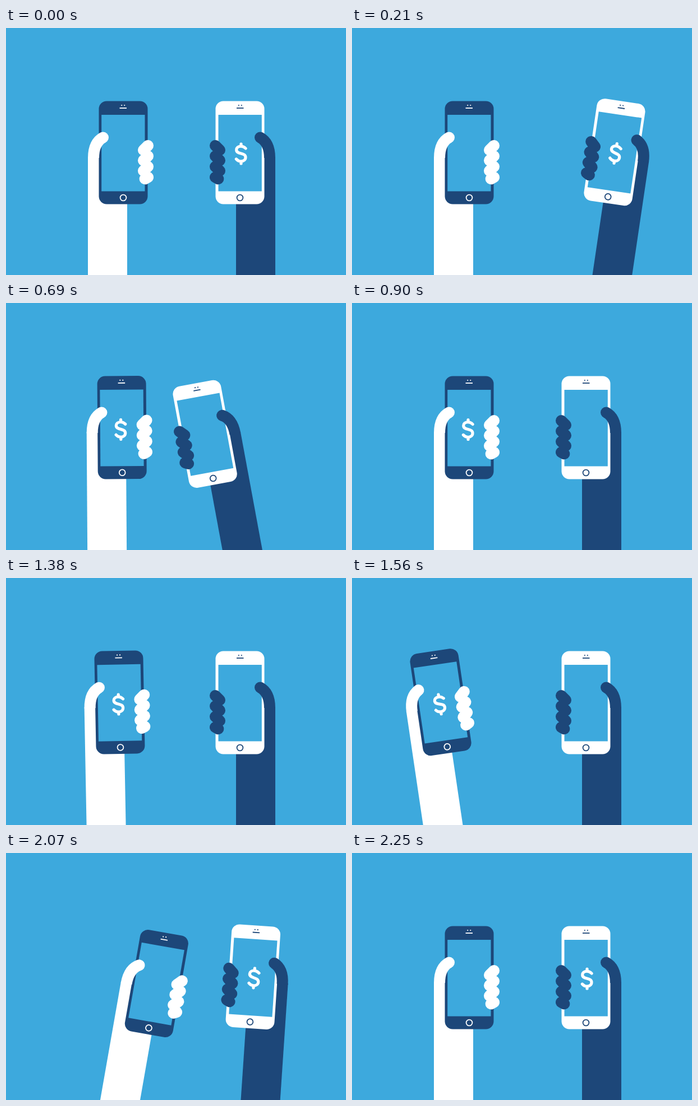
Animation, 606 px wide and 441 px high, one loop 2.7 s. Source, as an HTML page:

```html
<!DOCTYPE html>
<html lang="en">
<head>
<meta charset="utf-8">
<title>Phone to phone payment</title>
<style>
  html, body { margin: 0; width: 100%; height: 100%; overflow: hidden; background: #3da9dd; }
  svg { display: block; width: 100%; height: 100%; }
  .white-hand { --hand: #fff; --phone: #1d4779; }
  .navy-hand { --hand: #1d4779; --phone: #fff; }
  .arm { fill: var(--hand); }
  .case { fill: var(--phone); }
  .screen { fill: #3da9dd; }
  .grip { fill: none; stroke: var(--hand); stroke-width: 20; stroke-linecap: round; }
  .thumb { stroke-linecap: butt; }
  .detail { fill: none; stroke: var(--hand); stroke-width: 1.8; }
  .dot { fill: var(--hand); }
  #cash { fill: none; stroke: #fff; stroke-width: 5.2; stroke-linecap: round; }
</style>
</head>
<body>
<svg viewBox="0 0 606 441">
  <defs>
    <g id="hand">
      <rect class="arm" x="146" y="230" width="70" height="480"/>
      <rect class="case" x="165.5" y="130.5" width="87" height="184" rx="14"/>
      <rect class="screen" x="170.2" y="155" width="77.3" height="136.5"/>
      <circle class="dot" cx="206.2" cy="138" r="1.1"/>
      <circle class="dot" cx="211.2" cy="138" r="1.1"/>
      <path class="detail" d="M202.5 143H215"/>
      <circle class="detail" cx="209" cy="303" r="5.4"/>
      <path class="grip thumb" d="M173 195.5C161 202 156 215 156 232"/>
      <circle class="dot" cx="173" cy="195.5" r="10"/>
      <path class="grip" d="M253 210L245 218M253 228.7L245 236.5M253 247.5L245 255M253 266.5L247.7 269.3"/>
    </g>
  </defs>
  <g id="left" class="white-hand"><use href="#hand"/></g>
  <g id="right" class="navy-hand"><use href="#hand"/></g>
  <path id="cash" d="M419 207V211M419 238V242M427.2 215C424.5 212.4 421.6 211.2 418.8 211.2
    C413.6 211.2 410.7 214.2 410.7 217.4C410.7 226.5 427 221.6 427 231
    C427 235.2 423.5 238 418.8 238C415.2 238 412.6 236.6 410.4 234"/>
</svg>
<script>
  const LOOP = 2700, HALF = LOOP / 2, STEP = 30;
  const PEAK = 450, HIT = 690, REST = 900;
  const OUT = 14.1, REACH = 10.46, KICK = 4.4;
  const el = id => document.getElementById(id);
  const left = el("left"), right = el("right"), cash = el("cash");

  const easeInOut = x => (1 - Math.cos(Math.PI * Math.min(1, Math.max(0, x)))) / 2;
  const span = (t, from, to) => (t - from) / (to - from);

  // The payer winds up, swings inward, then returns; positive is outward.
  function swing(t) {
    if (t <= 0 || t >= REST) return 0;
    if (t < PEAK) {
      const x = t / PEAK;
      return OUT * (1.1 * x + 0.8 * x * x - 0.9 * x ** 3);
    }
    if (t < HIT) return OUT - (OUT + REACH) * span(t, PEAK, HIT) ** 2;
    return -REACH * (1 - easeInOut(span(t, HIT, REST)));
  }

  // The receiver is knocked outward and settles.
  function kick(t) {
    return KICK * (easeInOut(span(t, 680, 732)) - easeInOut(span(t, 732, REST)));
  }

  function draw(t) {
    const leftTurn = `rotate(${-swing(t - HALF) - kick(t)} 178 569)`;
    const tilt = swing(t) + kick(t - HALF);
    const paid = t >= HIT && t < HIT + HALF;
    left.setAttribute("transform", leftTurn);
    right.setAttribute("transform", `translate(626) scale(-1 1) rotate(${-tilt} 178 569)`);
    cash.setAttribute("transform",
      paid ? `${leftTurn} translate(-212 1.5)` : `rotate(${tilt} 448 569)`);
  }

  const start = performance.now();
  const LEAD = 8; // keeps late screen refreshes on the right step
  function tick() {
    const t = performance.now() - start + LEAD;
    draw(Math.floor(t / STEP) * STEP % LOOP);
    requestAnimationFrame(tick);
  }
  tick();
</script>
</body>
</html>
```
